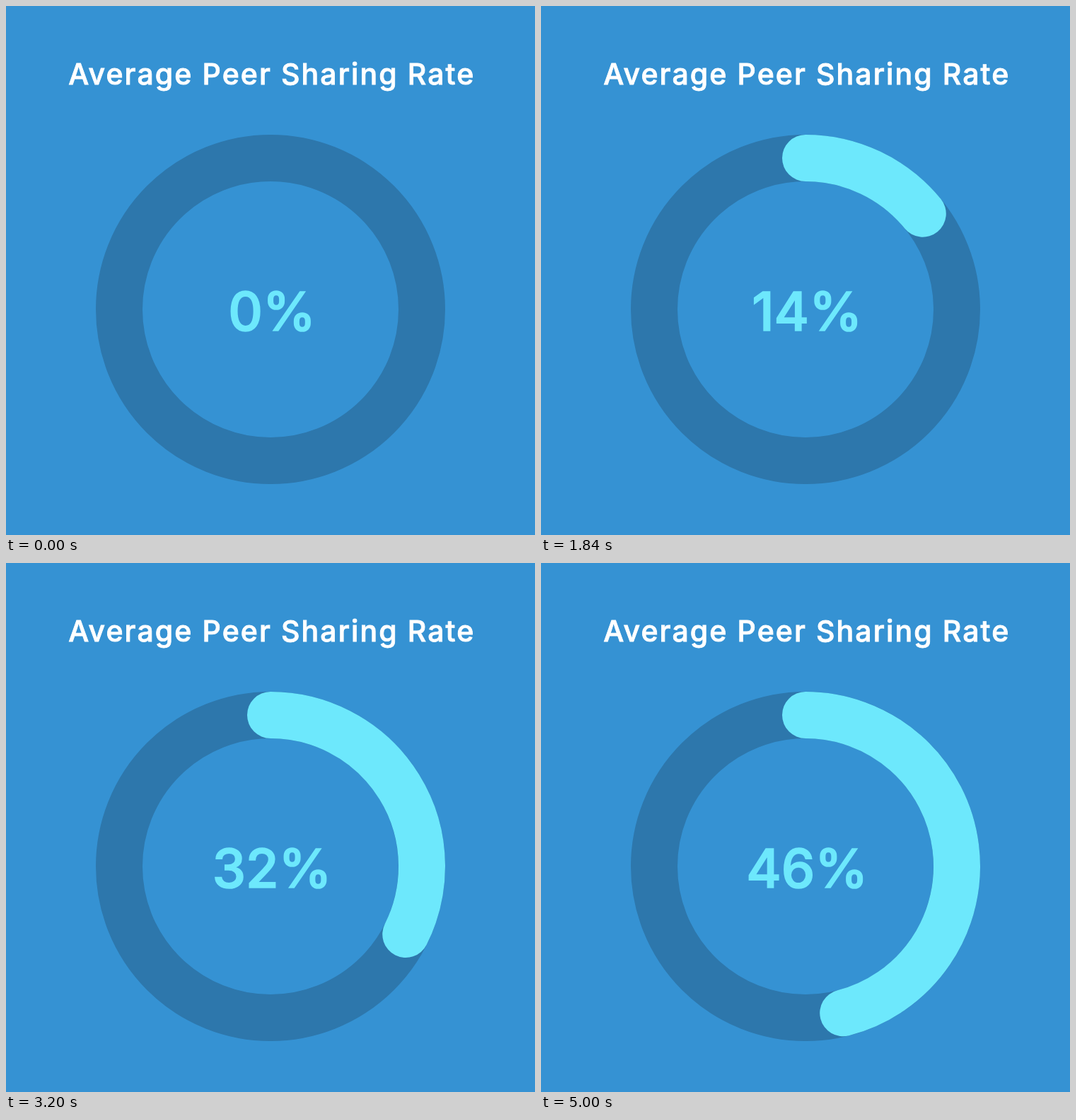
Recreate the animation shown at these times as an HTML page. Size 748 by 748 pixels, loop 5.56 s.

```html
<!DOCTYPE html>
<html lang="en">
<head>
<meta charset="utf-8">
<title>Average Peer Sharing Rate</title>
<style>
  html, body { margin: 0; width: 100%; height: 100%; overflow: hidden; background: #3592d3; }
  svg { display: block; width: 100%; height: 100%; }
  text { font-family: Inter, "Open Sans", sans-serif; font-weight: 500; text-anchor: middle; }
  .title { font-size: 41px; letter-spacing: 2.1px; fill: #fff; stroke: #fff; stroke-width: .9; }
  .value { font-size: 75.5px; fill: #6de8fc; stroke: #6de8fc; stroke-width: 1.7; }
  .ring { fill: none; stroke-width: 66; stroke-linecap: round; }
</style>
</head>
<body>
<svg viewBox="0 0 748 748">
  <text class="title" x="375.8" y="110.6">Average Peer Sharing Rate</text>
  <circle class="ring" cx="374" cy="429" r="214" stroke="#2d77ac"/>
  <path class="ring" id="arc" stroke="#6de8fc"/>
  <text class="value" id="value" x="376.2" y="459.2">0%</text>
</svg>
<script>
  const LOOP = 5560, RISE = 5000, STEP = 40, GOAL = 46;
  const CX = 374, CY = 429, R = 214;
  const arc = document.getElementById('arc');
  const value = document.getElementById('value');
  const start = performance.now();

  const smooth = x => x * x * (3 - 2 * x);

  function arcPath(percent) {
    if (percent <= 0) return '';
    const a = percent / 100 * 2 * Math.PI;
    const x = CX + R * Math.sin(a), y = CY - R * Math.cos(a);
    return `M${CX} ${CY - R}A${R} ${R} 0 0 1 ${x.toFixed(3)} ${y.toFixed(3)}`;
  }

  function draw() {
    const elapsed = Math.max(0, performance.now() - start) % LOOP;
    const t = Math.floor(elapsed / STEP) * STEP;
    const percent = GOAL * smooth(Math.min(t / RISE, 1));
    arc.setAttribute('d', arcPath(percent));
    value.textContent = Math.round(percent) + '%';
    requestAnimationFrame(draw);
  }
  draw();
</script>
</body>
</html>
```
